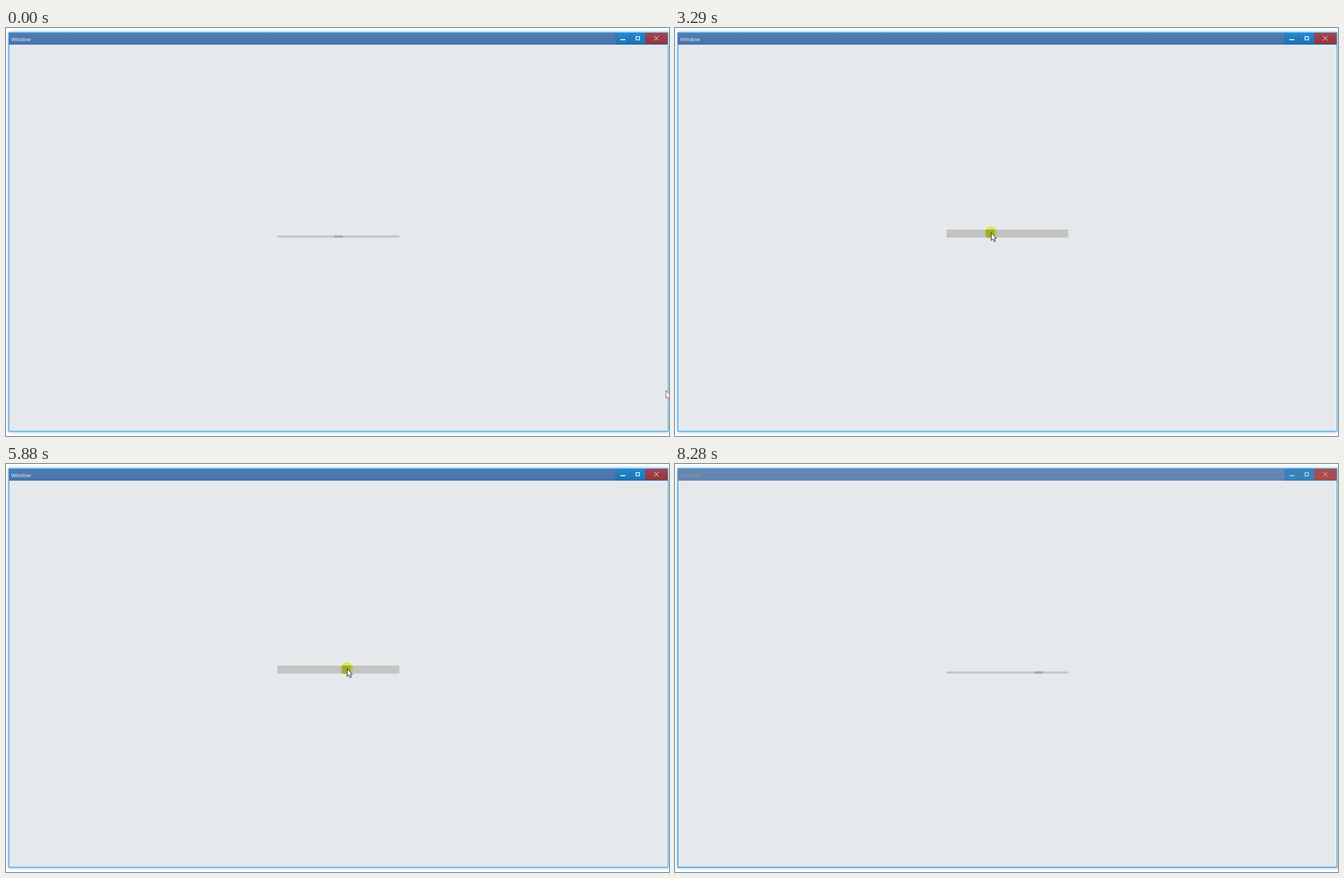
An HTML page with a canvas for the animation above (8.35 s loop, 955x587 px).

```html
<!DOCTYPE html>
<html lang="en">
<head>
<meta charset="utf-8">
<title>Slider</title>
<style>
html, body { margin: 0; width: 100%; height: 100%; overflow: hidden; background: #fff; }
canvas { display: block; }
</style>
</head>
<body>
<canvas id="stage" width="955" height="587"></canvas>
<script>
const ctx = document.getElementById('stage').getContext('2d');
const LOOP = 8350, STEP = 78;
const clamp = v => Math.max(0, Math.min(1, v));
const point = (x, y, u = 1) => ({ x, y, u });

// Each move starts where the one before it ended
const moves = [];
let rest = point(950, 521, 0);
function move(start, end, ...stops) {
  const steps = Math.round((end - start) / STEP) + 1;
  moves.push({ start, steps, dt: (end - start) / (steps - 1), path: [rest, ...stops] });
  rest = { ...stops[stops.length - 1], u: 0 };
}

move(390, 1170, point(922, 480, .18), point(841, 453, .4), point(553, 312, .82), point(519, 289, .91), point(512, 291));
move(1270, 2040, point(483, 295));
move(2110, 2430, point(503, 295));
move(2580, 3350, point(430, 294, .6), point(455, 294, .91), point(468, 294));
move(3430, 3590, point(488, 294));
move(3750, 4070, point(501, 325, .4), point(506, 381));
move(4460, 5240, point(507, 305, .545), point(495, 294));
move(5320, 5710, point(486, 294));
move(5880, 6350, point(524, 294));
move(6490, 6790, point(528, 354));
move(7110, 7880, point(735, 430, .52), point(802, 450, .68), point(877, 538, .87), point(913, 573));

const within = (t, a, b) => t >= a && t < b;
const isPressed = t => within(t, 2040, 3590) || within(t, 5320, 6350);

function along(path, u) {
  let i = 1;
  while (i < path.length - 1 && u > path[i].u) i++;
  const a = path[i - 1], b = path[i];
  const k = clamp((u - a.u) / (b.u - a.u));
  return { x: Math.round(a.x + (b.x - a.x) * k), y: Math.round(a.y + (b.y - a.y) * k) };
}

// Position and the stepped time at which it was last refreshed
function pointerAt(t) {
  const m = moves.filter(m => t >= m.start).pop();
  if (!m) return { ...moves[0].path[0], tick: 0 };
  const k = Math.min(m.steps - 1, Math.floor((t - m.start) / m.dt + .2));
  return { ...along(m.path, (k + 1) / m.steps), tick: m.start + k * m.dt };
}

// The bar opens under the pointer and closes when it leaves
function openness(t) {
  const ramp = start => clamp((t - start + 20) / 130);
  return ramp(1130) - ramp(3750) + ramp(4960) - ramp(6490);
}

function handleCentre(t, x) {
  if (isPressed(t)) return x - 1;
  return t < 2040 ? 479 : t < 5320 ? 487 : 524;
}

function rect(x, y, w, h, fill) {
  ctx.fillStyle = fill;
  ctx.fillRect(x, y, w, h);
}

function shade(top, bottom) {
  const g = ctx.createLinearGradient(0, 7, 0, 24);
  g.addColorStop(0, top);
  g.addColorStop(1, bottom);
  return g;
}

function line(x0, y0, x1, y1) {
  ctx.beginPath();
  ctx.moveTo(x0, y0);
  ctx.lineTo(x1, y1);
  ctx.stroke();
}

function drawWindow(dim) {
  rect(0, 0, 955, 587, '#fff');
  ctx.save();
  ctx.shadowColor = '#55b4f5';
  ctx.shadowBlur = 4;
  rect(3.5, 6, 950.5, 575, dim ? '#5a9fd0' : '#62b0e8');
  ctx.restore();
  rect(5, 24, 948, 555.5, '#e5e9ec');
  rect(4, 7, 949, 17, dim ? '#6487b2' : shade('#4f7db3', '#4673aa'));

  ctx.font = '8px Roboto, "Open Sans", sans-serif';
  ctx.fillStyle = dim ? '#8d939d' : '#e4eaf1';
  ctx.fillText('Window', 7.5, 18.5);

  const blue = dim ? '#3583bd' : shade('#2589cf', '#1b71b3');
  const red = dim ? '#a94c4c' : shade('#a4454b', '#94343a');
  const icon = dim ? '#c0cfdd' : '#f0f5fa';
  rect(878, 7, 75, 17, dim ? '#4a76a4' : '#356ba5');
  rect(879, 7, 20, 16, blue);
  rect(900, 7, 20, 16, blue);
  rect(921, 7, 32, 16, red);
  rect(885, 16, 7, 1.5, icon);
  ctx.strokeStyle = icon;
  ctx.lineWidth = 1.2;
  ctx.strokeRect(907.5, 12.5, 5, 4.5);
  ctx.strokeStyle = dim ? '#d0aaaa' : '#ead8d9';
  ctx.lineWidth = 1;
  line(933.5, 11.5, 940, 18);
  line(940, 11.5, 933.5, 18);
}

function drawSlider(centre, open, pressed) {
  const h = 3 + 8.5 * open, y = 301.5 - h;
  rect(391, y, 175.5, h, '#c3c4c3');
  rect(centre - 6, y, 12, h, pressed ? '#a5a8a8' : '#8badca');
}

function drawPress(x, y) {
  ctx.save();
  ctx.globalCompositeOperation = 'multiply';
  ctx.fillStyle = '#f8ff50';
  ctx.beginPath();
  ctx.arc(x, y + .3, 9, 0, Math.PI * 2);
  ctx.fill();
  ctx.restore();
}

const arrow = new Path2D('M.5 .5V11.8L3 9.4L4.8 13.4L6.6 12.6L4.9 8.8H8Z');

function drawPointer(x, y, faint) {
  ctx.save();
  ctx.translate(x, y);
  ctx.fillStyle = '#fff';
  ctx.fill(arrow);
  ctx.strokeStyle = faint ? '#a05555' : '#26282b';
  ctx.lineWidth = .9;
  ctx.stroke(arrow);
  ctx.restore();
}

function render(t) {
  const { x, y, tick } = pointerAt(t);
  const pressed = isPressed(t);
  drawWindow(t >= 8280);
  drawSlider(handleCentre(t, x), openness(tick), pressed);
  if (pressed) drawPress(x, y);
  if (t < 8040) drawPointer(x, y, t < 160 || t >= 7960);
}

const begin = performance.now();
function loop() {
  render((performance.now() - begin) % LOOP);
  requestAnimationFrame(loop);
}
loop();
</script>
</body>
</html>
```
